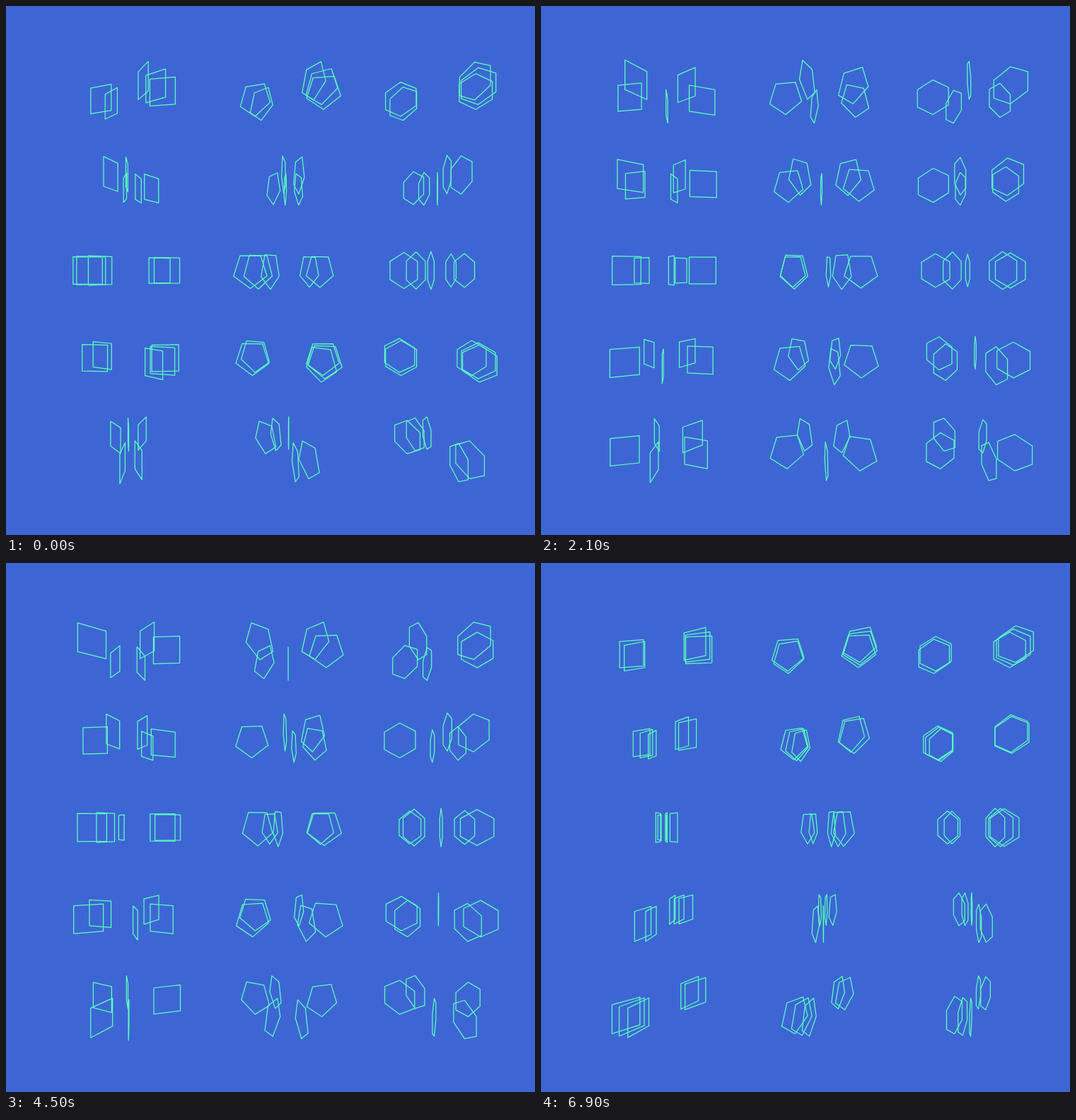
These frames come from a looping animation (748 by 748 pixels, 7000 ms). An HTML page with a canvas:

```html
<!DOCTYPE html>
<html>
<head>
<meta charset="utf-8">
<style>
  html, body { margin: 0; height: 100%; overflow: hidden; background: #3d66d4; }
  canvas { display: block; }
</style>
</head>
<body>
<canvas id="stage" width="748" height="748"></canvas>
<script>
const SIZE = 748, MID = SIZE / 2;
const EYE = MID / Math.tan(Math.PI / 6);
const UNIT = SIZE / 30;
const ROW_STEP = SIZE / 6;
const ROWS = 5, PER_ROW = 5;
const LOOP = 7000, STEP = 100, LEAD = 20;
const rad = deg => deg * Math.PI / 180;

// Each column has its own polygon, turning about a vertical axis.
const columns = [
  { sides: 4, axis: -8 * UNIT, radius: 1.07 * UNIT, tilt: 45 },
  { sides: 5, axis: UNIT, radius: UNIT, tilt: 90 },
  { sides: 6, axis: 9.5 * UNIT, radius: UNIT, tilt: 90 }
];

const ctx = document.getElementById('stage').getContext('2d');

function drawPanel({ sides, axis, radius, tilt }, y, orbit, turn) {
  ctx.beginPath();
  for (let k = 0; k < sides; k++) {
    const a = rad(tilt + 360 * k / sides);
    const reach = orbit + radius * Math.cos(a);
    const scale = EYE / (EYE - reach * Math.sin(turn));
    ctx.lineTo(MID + (axis + reach * Math.cos(turn)) * scale,
               MID + (y + radius * Math.sin(a)) * scale);
  }
  ctx.closePath();
  ctx.stroke();
}

function draw() {
  const time = (performance.now() + LEAD) % LOOP;
  const tick = Math.floor(time / STEP);
  // The angle between neighbours swings between 5 and 55 degrees.
  const spread = 30 + 25 * Math.cos(rad(10 * tick - 139.75));

  ctx.fillStyle = '#3d66d4';
  ctx.fillRect(0, 0, SIZE, SIZE);
  ctx.strokeStyle = '#5affbe';
  ctx.lineWidth = 1.25;
  ctx.lineJoin = 'round';

  for (let row = 0; row < ROWS; row++) {
    for (let i = 0; i < PER_ROW; i++) {
      const index = row * PER_ROW + i;
      const turn = rad((index + 1) * spread + 180 * index);
      // Each later panel in a row orbits slightly further out.
      const orbit = UNIT * (2 + i / 20);
      for (const column of columns) drawPanel(column, (row - 2) * ROW_STEP, orbit, turn);
    }
  }
  requestAnimationFrame(draw);
}
draw();
</script>
</body>
</html>
```
